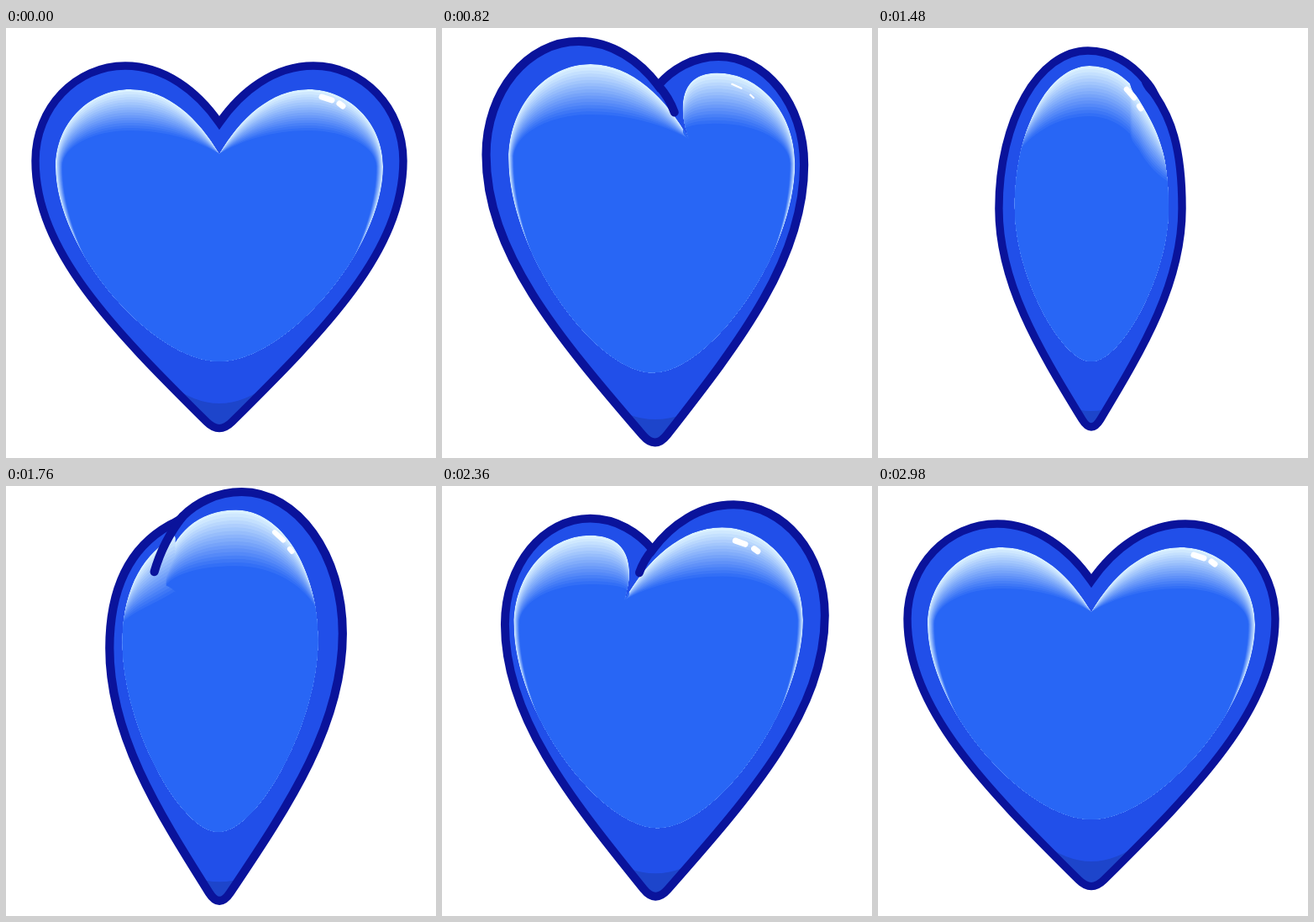
Write an HTML page with a canvas that moves like this. It is 512 px wide and 512 px high and loops after 3000 ms.

```html
<!DOCTYPE html>
<html lang="en">
<head>
<meta charset="utf-8">
<title>Beating heart</title>
<style>
  html, body { margin: 0; width: 100%; height: 100%; overflow: hidden; background: #fff; }
  canvas { display: block; width: 100vmin; height: 100vmin; }
</style>
</head>
<body>
<canvas id="stage" width="512" height="512"></canvas>
<script>
const ctx = document.getElementById('stage').getContext('2d');
const LOOP = 3000, EDGE = 1490, CX = 254, CY = 261;
const LINE = '#0a139b', SIDE = '#214fe9', FACE = [40, 102, 245], SHINE = [218, 241, 255], TIP = '#1d45cb';

// Poses from front view to edge view, left lobe nearer.
// left side x y, left top x y, cleft x y, right top x y, right side x y, top slope, crease end x y
const OUTLINE = [
  [35, 158, 142, 45, 254, 113, 366, 45, 473, 158, 0, 254, 113],
  [32, 157, 145, 40, 258, 97, 350, 51, 459, 174, 0, 263, 109],
  [63.5, 160, 166, 35.5, 257, 86, 327, 51, 423, 170, 0, 272, 112],
  [83, 155, 188, 30, 261, 67, 310, 52, 399, 175, 0, 293, 117],
  [101, 162, 213, 28, 277, 52, 298, 54, 384, 187, 0, 318, 133],
  [144, 215, 250, 27, 318, 62, 330, 80, 362, 215, 1.5, 330, 80]
];
// same first 11, then bottom x y, left bend, right bend, shine depth, shine spread, cleft drop
const FACES = [
  [59, 165, 148, 73, 254, 150, 360, 73, 449, 165, 0, 254, 397, 0, 0, 49, 8, 0],
  [58, 167, 154, 68, 283, 148, 355, 74, 445, 177, 0, 250, 399, 0, -32, 57, 8, 0],
  [88, 165, 179, 61, 289, 143, 327, 70, 413, 170, 0, 251, 399, 0, -22, 55, 6, 0],
  [110, 160, 198, 53, 305, 139, 303, 67, 387, 168, 0, 254, 399, 0, -20, 60, 3, 0],
  [132, 172, 222, 49, 318, 133, 299, 68, 371, 178, 0, 255, 401, 12, -12, 62, 0, 0],
  [163, 215, 252, 45, 300, 66, 312, 87, 346, 215, 1.7, 254, 397, 0, 0, 60, -18, 60]
];
const TURN_OUT = [0, 420, 760, 1060, 1180, EDGE];
const TURN_BACK = [EDGE, 1900, 2060, 2360, 2700, 2980];

// two dashes as x1 y1 x2 y2, then line width
const GLINT_TIMES = [0, 420, 1180, 1480, 2060, 2360, 2980];
const GLINTS = [
  [376, 82, 388, 86, 397, 90, 401, 93, 7],
  [369, 83, 381, 88, 391, 94, 395, 97, 4],
  [309, 79, 318, 84, 327, 92, 330, 96, 1.5],
  [296, 73, 305, 83, 311, 93, 313, 96, 6.5],
  [338, 72, 348, 78, 357, 86, 360, 89, 4],
  [344, 76, 355, 80, 365, 85, 369, 88, 6.6],
  [376, 82, 388, 86, 397, 90, 401, 93, 7]
];

// Smooth spline through rows of numbers, at rest at both ends.
function spline(times, rows, t) {
  const last = times.length - 1;
  if (t <= times[0]) return rows[0];
  if (t >= times[last]) return rows[last];
  let i = 0;
  while (t >= times[i + 1]) i++;
  const span = times[i + 1] - times[i], u = (t - times[i]) / span;
  const slope = (k, j) => k === 0 || k === last ? 0 :
    (rows[k + 1][j] - rows[k - 1][j]) / (times[k + 1] - times[k - 1]) * span;
  return rows[i].map((a, j) => {
    const b = rows[i + 1][j], d = b - a, m = slope(i, j), n = slope(i + 1, j);
    return a + u * (m + u * (3 * d - 2 * m - n + u * (m + n - 2 * d)));
  });
}

const smooth = u => u * u * (3 - 2 * u);

function beat(t) {
  const p = t % 500;
  if (t > 2500 || p < 140 || p > 480) return 1;
  return 1 + 0.092 * smooth(p < 280 ? (p - 140) / 140 : (480 - p) / 200);
}

// Top of the heart, from the left side to the right side.
function lobes(path, [lx, ly, ax, ay, cx, cy, bx, by, rx, ry, m], hl = 0, hr = 0) {
  const dx = cx - ax, dy = cy - ay, ex = bx - cx, ey = by - cy, h = 0.55 * (rx - bx);
  path.moveTo(lx, ly);
  path.bezierCurveTo(lx, ly - 0.56 * (ly - ay), ax - 0.55 * (ax - lx), ay, ax, ay);
  path.bezierCurveTo(ax + 0.42 * dx + 1.2 * hl, ay, cx - 0.23 * dx + hl, cy - 0.55 * dy, cx, cy);
  path.bezierCurveTo(cx + 0.23 * ex + hr, cy + 0.55 * ey,
    bx - 0.42 * ex + 1.2 * hr, by - 0.42 * ex * m, bx, by);
  path.bezierCurveTo(bx + h, by + h * m, rx, ry - 0.56 * (ry - by), rx, ry);
}

function outlinePath(p) {
  const path = new Path2D(), tipY = 484;
  const flank = (x, y) => {
    const dx = 0.58 * (x - CX), dy = -0.387 * (tipY - y), k = 21 / Math.hypot(dx, dy);
    return { x, y: y + 0.344 * (470 - y), qx: CX + dx, qy: tipY + dy, ex: CX + dx * k, ey: tipY + dy * k };
  };
  const l = flank(p[0], p[1]), r = flank(p[8], p[9]);
  lobes(path, p);
  path.bezierCurveTo(r.x, r.y, r.qx, r.qy, r.ex, r.ey);
  path.quadraticCurveTo(CX, tipY, l.ex, l.ey);
  path.bezierCurveTo(l.qx, l.qy, l.x, l.y, p[0], p[1]);
  path.closePath();
  return path;
}

function facePath(p) {
  const path = new Path2D(), [bx, by, hl, hr] = p.slice(11, 15);
  lobes(path, p, hl, hr);
  path.bezierCurveTo(p[8], p[9] + 0.43 * (by - p[9]), bx + 0.4 * (p[8] - bx), by, bx, by);
  path.bezierCurveTo(bx + 0.4 * (p[0] - bx), by, p[0], p[1] + 0.43 * (by - p[1]), p[0], p[1]);
  path.closePath();
  return path;
}

function drawFace(p) {
  const bands = 16, [depth, spread, drop] = p.slice(15);
  ctx.save();
  ctx.clip(facePath(p));
  for (let i = 0; i <= bands; i++) {
    const k = i / bands, q = p.slice();
    q[0] += spread * k;
    q[8] -= spread * k;
    q[3] += depth * k;
    q[7] += depth * k;
    q[5] += drop * k;
    q[12] += 30 * k;
    ctx.fillStyle = `rgb(${SHINE.map((c, j) => Math.round(c + (FACE[j] - c) * k))})`;
    ctx.fill(facePath(q));
  }
  ctx.restore();
}

function drawTip(width) {
  const y = 447 + (1 - width / 448) * 18;
  ctx.beginPath();
  ctx.moveTo(CX - 60, y - 23.5);
  ctx.quadraticCurveTo(CX, y + 23.5, CX + 60, y - 23.5);
  ctx.lineTo(CX + 60, 500);
  ctx.lineTo(CX - 60, 500);
  ctx.fillStyle = TIP;
  ctx.fill();
}

function drawBody(p, face) {
  const body = outlinePath(p), [cx, cy] = p.slice(4, 6), [tx, ty] = p.slice(11);
  ctx.fillStyle = SIDE;
  ctx.fill(body);
  ctx.save();
  ctx.clip(body);
  drawTip(p[8] - p[0] + 9);
  drawFace(face);
  ctx.restore();

  ctx.strokeStyle = LINE;
  ctx.lineWidth = 9.4;
  ctx.lineCap = 'round';
  ctx.miterLimit = 2.2;
  ctx.stroke(body);
  if (Math.hypot(tx - cx, ty - cy) > 1) {
    ctx.beginPath();
    ctx.moveTo(cx, cy);
    ctx.quadraticCurveTo((cx + tx) / 2 + 0.1 * (ty - cy), (cy + ty) / 2 - 0.1 * (tx - cx), tx, ty);
    ctx.stroke();
  }
}

function drawGlint(g) {
  ctx.strokeStyle = '#fff';
  ctx.lineWidth = g[8];
  ctx.beginPath();
  for (const i of [0, 4]) {
    ctx.moveTo(g[i], g[i + 1]);
    ctx.lineTo(g[i + 2], g[i + 3]);
  }
  ctx.stroke();
}

function draw(now) {
  const t = now % LOOP, back = t > EDGE, s = beat(t);
  const pose = rows => back ? spline(TURN_BACK, rows.slice().reverse(), t) : spline(TURN_OUT, rows, t);

  ctx.setTransform(1, 0, 0, 1, 0, 0);
  ctx.fillStyle = '#fff';
  ctx.fillRect(0, 0, 512, 512);
  ctx.translate(CX, CY);
  ctx.scale(s, s);
  ctx.translate(-CX, -CY);

  ctx.save();
  if (back) ctx.transform(-1, 0, 0, 1, 2 * CX, 0);
  drawBody(pose(OUTLINE), pose(FACES));
  ctx.restore();

  ctx.lineCap = 'round';
  drawGlint(spline(GLINT_TIMES, GLINTS, t));
}

const start = performance.now();
function tick() {
  draw(performance.now() - start);
  requestAnimationFrame(tick);
}
tick();
</script>
</body>
</html>
```
